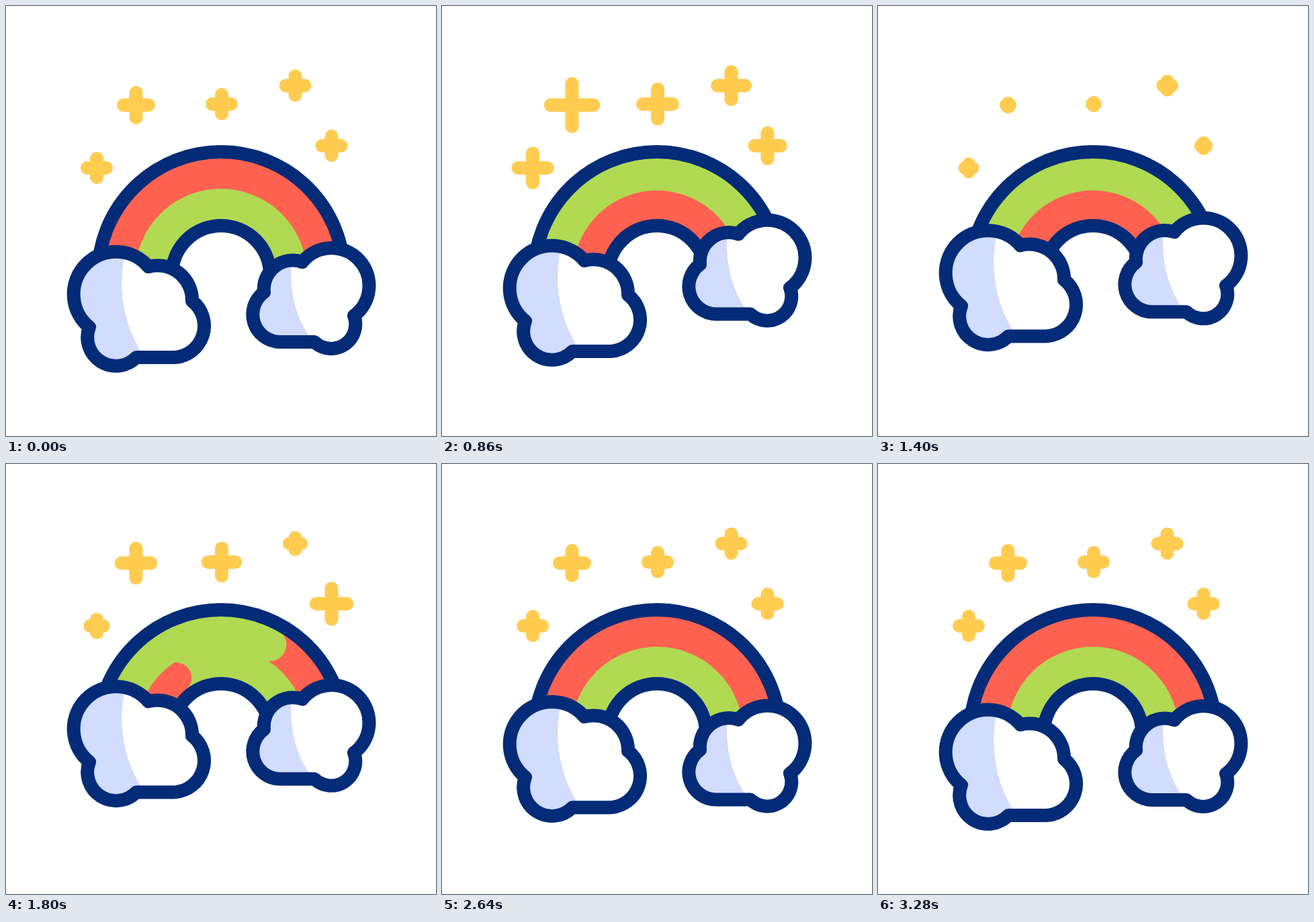
These frames come from a looping animation (640x640 px, 3.6 s). An HTML page:

```html
<!DOCTYPE html>
<html lang="en">
<head>
<meta charset="utf-8">
<title>Rainbow</title>
<style>
html, body { margin: 0; width: 100%; height: 100%; overflow: hidden; background: #fff; }
svg { display: block; width: 100vw; height: 100vh; }
.line { fill: none; stroke: #032b77; stroke-width: 20; stroke-linecap: round; stroke-linejoin: round; }
.band { fill: none; }
.swap { stroke-linecap: round; }
.red { stroke: #ff6251; }
.green { stroke: #b1da52; }
.star { fill: none; stroke: #ffcc50; stroke-width: 20; stroke-linecap: round; }
.shade { fill: #d2dcfd; }
</style>
</head>
<body>
<svg viewBox="0 0 640 640">
  <defs>
    <path id="leftShape" d="M124 478A63.2 63.2 0 1 1 212 388A51.5 51.5 0 0 1 277 439A47 47 0 0 1 250 523H194A42.5 42.5 0 0 1 124 478Z"/>
    <path id="rightShape" d="M384 426A43 43 0 0 1 441 381A55.95 55.95 0 1 1 518 461A36.3 36.3 0 0 1 459 500H407A41 41 0 0 1 384 426Z"/>
    <clipPath id="leftClip"><use href="#leftShape"/></clipPath>
    <clipPath id="rightClip"><use href="#rightShape"/></clipPath>
  </defs>
  <g id="stars"></g>
  <path class="band red" stroke-width="47" d="M169.5 408V400A150.5 150.5 0 0 1 470.5 400V408"/>
  <path class="band green" stroke-width="45" d="M214.5 408V400A105.5 105.5 0 0 1 425.5 400V408"/>
  <path id="inner" class="band swap red" stroke-width="46"/>
  <path id="outer" class="band swap green" stroke-width="49"/>
  <path class="line" d="M137 404V400A183 183 0 0 1 503 400V404"/>
  <path class="line" d="M247 400A73 73 0 0 1 393 400"/>
  <g id="left">
    <use href="#leftShape" fill="#fff"/>
    <path class="shade" clip-path="url(#leftClip)" d="M177 368C166 420 174 472 203 518V550H80V350Z"/>
    <use href="#leftShape" class="line"/>
  </g>
  <g id="right">
    <use href="#rightShape" fill="#fff"/>
    <path class="shade" clip-path="url(#rightClip)" d="M425 378C421 420 430 462 453 494V520H350V370Z"/>
    <use href="#rightShape" class="line"/>
  </g>
</svg>
<script>
const LOOP = 3600;
const $ = id => document.getElementById(id);

// Eased value through [time, value] keys.
function track(keys, t) {
  if (t <= keys[0][0]) return keys[0][1];
  for (let i = 1; i < keys.length; i++) {
    const [t0, a] = keys[i - 1], [t1, b] = keys[i];
    if (t < t1) {
      const s = (t - t0) / (t1 - t0);
      return a + (b - a) * s * s * (3 - 2 * s);
    }
  }
  return keys[keys.length - 1][1];
}

const leftKeys = [[480, 0], [1640, -35.5], [3270, 0]];
const rightKeys = [[0, 0], [1080, -46.5], [1220, -46.5], [2730, 0]];

// x, y, resting arm, longest arm, delay
const stars = [
  [484.5, 208, 14, 24, 0],
  [321, 146, 14, 24, 70],
  [193.5, 147.5, 18.5, 32, 152],
  [135, 241, 14, 24, 275],
  [430.5, 118.5, 14, 24, 295]
].map(([x, y, rest, long, delay]) => {
  const el = document.createElementNS("http://www.w3.org/2000/svg", "path");
  el.setAttribute("class", "star");
  $("stars").append(el);
  const short = long / 14;
  const keys = [[0, rest], [240, short], [675, long], [1285, short], [1885, long], [2285, rest]];
  return { el, x, y, delay, keys };
});

// Swapped colours enter at the right leg and leave at the left one.
const bands = [
  { el: $("inner"), r: 105.5, enter: 0, leave: 1416 },
  { el: $("outer"), r: 150, enter: 147, leave: 1563 }
];
const SWEEP = 600, END = 95;

function point(r, deg) {
  const a = deg * Math.PI / 180;
  return (320 + r * Math.sin(a)).toFixed(2) + " " + (400 - r * Math.cos(a)).toFixed(2);
}

function sweep(start, t) {
  return track([[start, END], [start + SWEEP, -END]], t);
}

function draw(t) {
  $("left").setAttribute("transform", `translate(0 ${track(leftKeys, t)})`);
  $("right").setAttribute("transform", `translate(0 ${track(rightKeys, t)})`);
  for (const { el, x, y, delay, keys } of stars) {
    const n = track(keys, t - delay);
    el.setAttribute("d", `M${x - n} ${y}H${x + n}M${x} ${y - n}V${y + n}`);
  }
  for (const { el, r, enter, leave } of bands) {
    const head = sweep(enter, t), tail = sweep(leave, t);
    const big = tail - head > 180 ? 1 : 0;
    el.setAttribute("d", tail - head < 0.1 ? "" :
      `M${point(r, head)}A${r} ${r} 0 ${big} 1 ${point(r, tail)}`);
  }
}

const begin = performance.now();
function tick() {
  draw((performance.now() - begin) % LOOP);
  requestAnimationFrame(tick);
}
draw(0);
requestAnimationFrame(tick);
</script>
</body>
</html>
```
